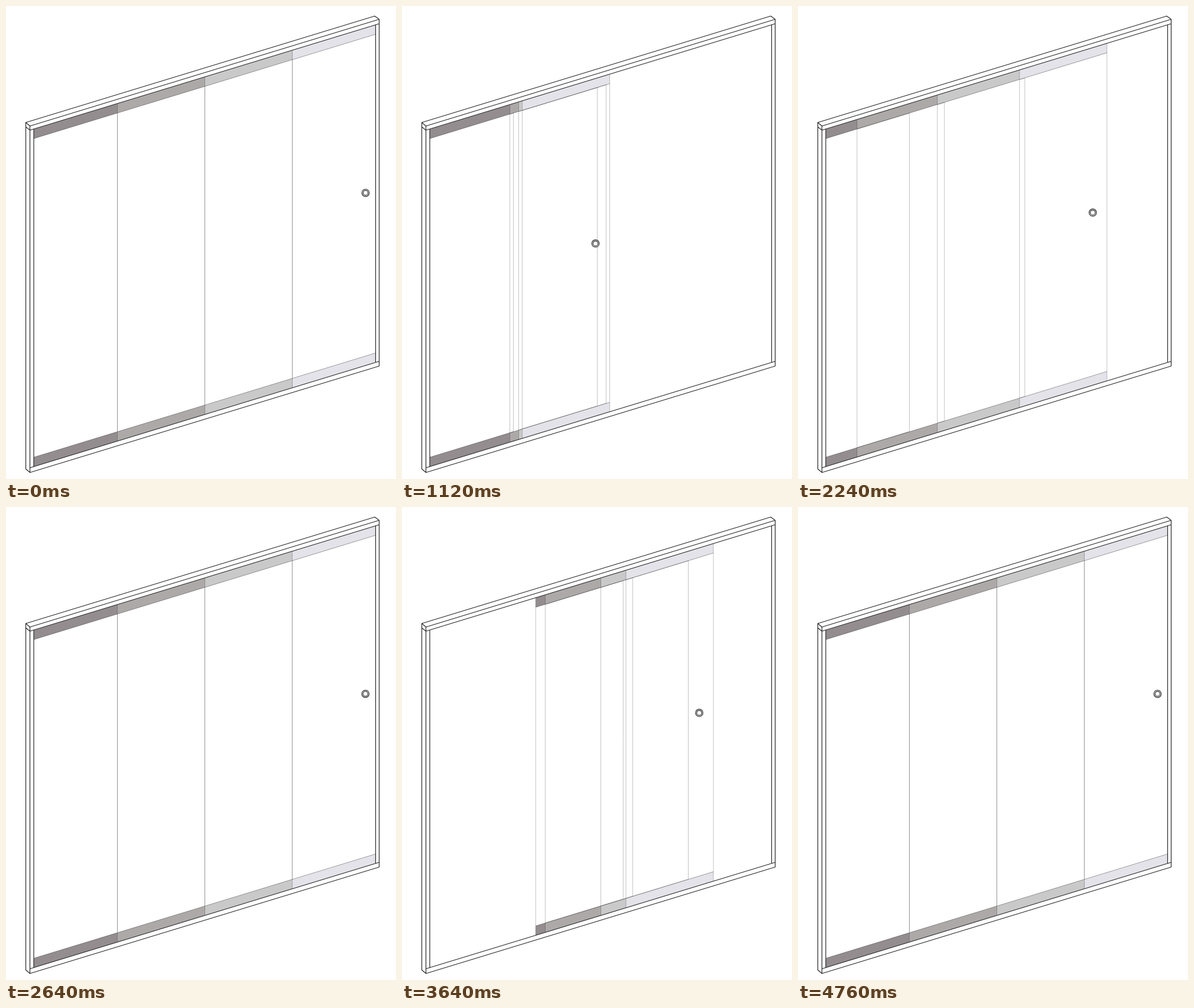
Write an HTML page with a canvas that moves like this. It is 660x800 px and loops after 5 s.

```html
<!DOCTYPE html>
<html lang="en">
<head>
<meta charset="utf-8">
<title>Sliding glass panels</title>
<style>
  html, body { margin: 0; width: 100%; height: 100%; overflow: hidden; background: #fff; }
  canvas { display: block; }
</style>
</head>
<body>
<canvas id="stage" width="660" height="800"></canvas>
<script>
const ctx = document.getElementById('stage').getContext('2d');
const LOOP = 5000, STEP = 40, CLOSED_AT = 4760;
const WIDTH = 148, STRIP = 16, SLOPE = 0.3048;
const HOME = [40.5, 188.5, 336.5, 484.5];
const COLORS = ['#938d8f', '#aea9a9', '#c9c9c9', '#e4e3e9'];

// Each move: start time, end time, left edge reached.
const DOOR_MOVES = [
  [60, 575, 344.5], [600, 1065, 204.5], [1095, 1550, 64.5],
  [1565, 2055, 344.5], [2055, 2655, 484.5],
  [2935, 3455, 396], [3455, 3930, 344.5], [4140, 4990, 484.5]
];
const REAR_MOVES = [[2888, 3408, 176.5], [3430, 3930, 309], [4140, 4811, 40.5]];
const SECOND_MOVES = [[3430, 3930, 332]];

const clamp = (v, lo, hi) => Math.min(hi, Math.max(lo, v));
const ease = u => (1 - Math.cos(Math.PI * clamp(u, 0, 1))) / 2;
const topY = x => 210 - SLOPE * (x - 41);
const bottomY = x => topY(x) + 571;

function track(t, x, moves) {
  for (const [from, to, target] of moves) {
    if (t <= from) break;
    x += (target - x) * ease((t - from) / (to - from));
  }
  return x;
}

function pose(t) {
  if (t >= CLOSED_AT) return HOME;
  let [a, b, c] = HOME;
  const d = track(t, HOME[3], DOOR_MOVES);
  if (t < 1557) {                       // door pushes the others left
    c = Math.min(c, d - 6);
    b = clamp(c - 15, 52.5, b);
  } else if (t < 2800) {                // door drags them back
    c = clamp(d - 139, 58.5, c);
    b = clamp(c - 136, 52.5, b);
  } else {                              // both ends meet in the middle
    a = track(t, a, REAR_MOVES);
    b = track(t, b, SECOND_MOVES);
    if (t > 4140) b = clamp(a + 136, HOME[1], b);
  }
  return [a, b, c, d];
}

function path(points, close) {
  ctx.beginPath();
  points.forEach(([x, y]) => ctx.lineTo(x, y));
  if (close) ctx.closePath();
}

function line(...points) {
  path(points);
  ctx.stroke();
}

function drawStrip(x, edge, offset, color) {
  const r = x + WIDTH, y0 = edge(x) + offset, y1 = edge(r) + offset;
  path([[x, y0], [r, y1], [r, y1 + STRIP], [x, y0 + STRIP]], true);
  ctx.fillStyle = color;
  ctx.fill();
  ctx.strokeStyle = 'rgba(0,0,0,.24)';
  line([x, y0], [x, y0 + STRIP]);
  line([r, y1], [r, y1 + STRIP]);
  ctx.strokeStyle = 'rgba(0,0,0,.36)';
  const inner = offset ? 0 : STRIP;
  line([x, y0 + inner], [r, y1 + inner]);
}

function drawPanel(x, color) {
  ctx.lineWidth = 1;
  ctx.strokeStyle = 'rgba(0,0,0,.24)';
  for (const e of [x, x + WIDTH]) line([e, topY(e) + STRIP], [e, bottomY(e) - STRIP]);
  drawStrip(x, topY, 0, color);
  drawStrip(x, bottomY, -STRIP, color);
}

function drawHandle(x) {
  const y = topY(x) + 279;
  ctx.strokeStyle = '#333';
  ctx.lineWidth = 1.2;
  for (const [r, fill] of [[6.3, '#e2e2e2'], [4.1, '#fff']]) {
    ctx.beginPath();
    ctx.arc(x, y, r, 0, 2 * Math.PI);
    ctx.fillStyle = fill;
    ctx.fill();
    ctx.stroke();
  }
}

function drawFrame() {
  ctx.strokeStyle = '#262626';
  ctx.lineWidth = 1.2;
  ctx.lineJoin = 'round';
  path([[33.5, 197], [624, 17], [631.5, 22.5], [631.5, 609], [40.5, 789], [33.5, 783]], true);
  ctx.stroke();
  line([33.5, 197], [40.5, 203], [631.5, 22.5]);
  line([33.5, 204.5], [40.5, 210], [631.5, topY(631.5)]);
  line([40.5, 203], [40.5, 789]);
  line([40.5, 781], [631.5, bottomY(631.5)]);
  line([47, topY(47)], [47, bottomY(47)]);
  line([625.5, topY(625.5)], [625.5, bottomY(625.5)]);
}

function draw(t) {
  const panels = pose(t);
  ctx.fillStyle = '#fff';
  ctx.fillRect(0, 0, 660, 800);
  ctx.save();
  path([[47, topY(47)], [625.5, topY(625.5)], [625.5, bottomY(625.5)], [47, bottomY(47)]], true);
  ctx.clip();
  panels.forEach((x, i) => drawPanel(x, COLORS[i]));
  ctx.restore();
  drawHandle(panels[3] + 124);
  drawFrame();
}

function tick() {
  const t = performance.now() % LOOP;
  draw(Math.floor(t / STEP) * STEP);
  requestAnimationFrame(tick);
}
tick();
</script>
</body>
</html>
```
